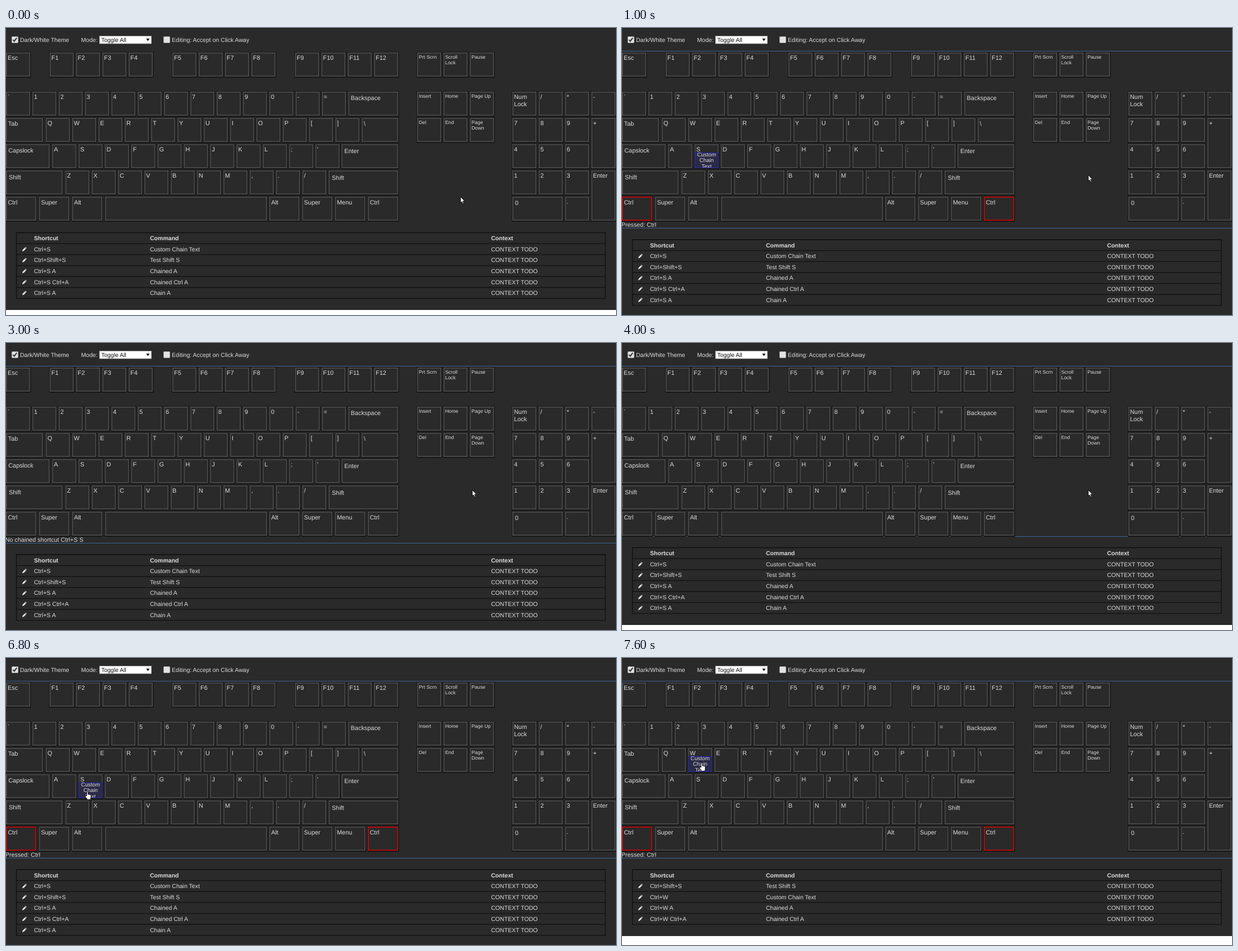
Animation of 1089 by 514 pixels, one loop 8000 ms. Source, as an HTML page:

```html
<!DOCTYPE html>
<html lang="en">
<head>
<meta charset="utf-8">
<title>Keyboard shortcuts</title>
<style>
  html, body { margin: 0; width: 100%; height: 100%; overflow: hidden; background: #fff; }
  svg { display: block; width: 1089px; height: 514px; }
  text { font-family: "Liberation Sans", Arial, sans-serif; fill: #dcdcdc; white-space: pre; text-rendering: geometricPrecision; }
</style>
</head>
<body>
<svg id="stage" viewBox="0 0 1089 514"></svg>
<script>
const stage = document.getElementById("stage");
const BG = "#2a2a2a", LOOP = 8000;
const KEY = 43, PITCH = 47;
const ROW_Y = [44, 114, 161, 208, 255, 302];

const rect = (x, y, w, h, attrs) => `<rect x="${x}" y="${y}" width="${w}" height="${h}" ${attrs}/>`;
const text = (x, y, s, size = 10.56, attrs = "") => `<text x="${x}" y="${y}" font-size="${size}" ${attrs}>${s}</text>`;

// Keyboard layout
const keys = [];
const add = (row, x, label, w = KEY, h = KEY, small = false) =>
  keys.push({ x, y: ROW_Y[row], w, h, label, small });
const run = (row, x, labels, small) =>
  labels.split(" ").forEach((s, i) => add(row, x + i * PITCH, s.replace("_", "\n"), KEY, KEY, small));

add(0, 0, "Esc");
run(0, 78, "F1 F2 F3 F4");
run(0, 297, "F5 F6 F7 F8");
run(0, 516, "F9 F10 F11 F12");
add(0, 734, "Prt Scrn", KEY, KEY, true);
run(0, 781, "Scroll_Lock Pause", true);
run(1, 0, "` 1 2 3 4 5 6 7 8 9 0 - =");
add(1, 611, "Backspace", 89);
run(1, 734, "Insert Home", true);
add(1, 828, "Page Up", KEY, KEY, true);
run(1, 904, "Num_Lock / * -");
add(2, 0, "Tab", 66);
run(2, 71, "Q W E R T Y U I O P [ ]");
add(2, 635, "\\", 65);
run(2, 734, "Del End Page_Down", true);
run(2, 904, "7 8 9");
add(2, 1045, "+", KEY, 90);
add(3, 0, "Capslock", 78);
run(3, 82.5, "A S D F G H J K L ; '");
add(3, 599, "Enter", 101);
run(3, 904, "4 5 6");
add(4, 0, "Shift", 101);
run(4, 106, "Z X C V B N M , . /");
add(4, 576, "Shift", 124);
run(4, 904, "1 2 3");
add(4, 1045, "Enter", KEY, 90);
["Ctrl", "Super", "Alt"].forEach((s, i) => add(5, i * 59, s, 54));
add(5, 177, "", 289);
["Alt", "Super", "Menu", "Ctrl"].forEach((s, i) => add(5, 470 + i * 58.7, s, 54));
add(5, 904, "0", 90);
add(5, 998, ".");

// Shortcut lists
const chain = [["Ctrl+S A", "Chained A"], ["Ctrl+S Ctrl+A", "Chained Ctrl A"], ["Ctrl+S A", "Chain A"]];
const all = [["Ctrl+S", "Custom Chain Text"], ["Ctrl+Shift+S", "Test Shift S"], ...chain];
const moved = [["Ctrl+Shift+S", "Test Shift S"], ["Ctrl+W", "Custom Chain Text"],
  ["Ctrl+W A", "Chained A"], ["Ctrl+W Ctrl+A", "Chained Ctrl A"]];

const custom = ["Custom", "Chain", "Text"];
const onS = { S: custom }, onW = { W: custom };
const held = { status: "Pressed: Ctrl", solid: ["Ctrl"] };

const scenes = [
  { at: 0, lines: false, arrow: [811, 302] },
  { at: 1000, ...held, entries: onS, arrow: [832, 263] },
  { at: 2000, status: "Waiting on chain: Ctrl+S", dotted: ["Ctrl", "S"], entries: { A: ["Chain A"] }, rows: chain, arrow: [832, 263] },
  { at: 3000, status: "No chained shortcut Ctrl+S S", arrow: [832, 263] },
  { at: 4000, arrow: [832, 263] },
  { at: 5000, ...held, entries: onS, arrow: [829.5, 263.5] },
  { at: 6000, ...held, entries: onS, arrow: [828.5, 263.5] },
  { at: 6400, ...held, entries: onS, hand: [127, 236] },
  { at: 6800, ...held, entries: onS, hand: [141, 239] },
  { at: 7200, ...held, entries: onW, hand: [138, 188] },
  { at: 7600, ...held, entries: onW, hand: [138, 188], rows: moved }
];

function drawKey(k, scene) {
  const { x, y, w, h, label, small } = k;
  const solid = scene.solid?.includes(label);
  const extra = w - KEY;
  const size = small ? 8.8 : 10.9;
  const tx = x + 3 + extra * 0.035;
  const ty = y + (small ? 10.8 : 13) + Math.min(extra, 90) * 0.05;
  let out = rect(x - 1, y - 1, w + 2.5, h + 3, 'fill="#171717"') +
    rect(x + 0.75, y + 0.75, w - 1.5, h - 1.5,
      `fill="${BG}" stroke="${solid ? "#e60000" : "#505050"}" stroke-width="1.5"`);
  if (scene.dotted?.includes(label))
    out += rect(x - 0.5, y - 0.5, w + 1, h + 1, 'fill="none" stroke="#cc1111" stroke-dasharray="1.6 1.6"');
  label.split("\n").forEach((s, i) => out += text(tx, ty + i * (small ? 9.8 : 12.5), s, size));

  const entry = scene.entries?.[label];
  if (entry) {
    const mid = y + 28.5;
    out += rect(x + 1, y + 15.5, w - 1.5, h - 16.5, 'fill="#2b2b45" stroke="#25259a" stroke-width="1.5"');
    const lines = entry.map((s, i) =>
      text(x + w / 2, mid + 3.5 + (i - (entry.length - 1) / 2) * 10.5, s, 9.85, 'text-anchor="middle"')).join("");
    out += `<svg x="${x}" y="${y}" width="${w}" height="${h - 1}" viewBox="${x} ${y} ${w} ${h - 1}">${lines}</svg>`;
  }
  return out;
}

function drawControls() {
  const box = x => rect(x + 0.5, 15.5, 11, 11, 'rx="1" fill="#e2e2e2" stroke="#aaa"');
  return box(10) + '<path d="M12.5 21l2.3 2.6 4.4-6" fill="none" stroke="#333" stroke-width="2"/>' +
    text(25, 25, "Dark/White Theme") + text(134, 25, "Mode:") +
    rect(167, 14.5, 92.5, 13.5, 'fill="#fff" stroke="#a9a9a9" stroke-width=".8"') +
    text(170, 25, "Toggle All", 10.45, 'style="fill:#111"') +
    '<path d="M250.3 19h6l-3 4.6z" fill="#111"/>' +
    box(281) + text(296, 25, "Editing: Accept on Click Away");
}

function drawTable(top, rows) {
  const step = 19.65, height = step * (rows.length + 1);
  let out = "";
  [["Shortcut", "Command", "Context"], ...rows].forEach(([a, b, c = "CONTEXT TODO"], i) => {
    const y = top + i * step, base = y + 13.6;
    const bold = i ? "" : 'font-weight="bold"';
    out += rect(18, y - 0.6, 1052.5, 1.3, 'fill="#111"') +
      text(50, base, a, 10.56, bold) + text(257, base, b, 10.56, bold) + text(866, base, c, 10.56, bold);
    if (i) out += `<path transform="translate(29 ${y + 5.8})" d="M0 8l.7-2.7L4.7 1.3 6.7 3.3 2.7 7.3zM5.2.8l.8-.8 2 2-.8.8z" fill="#e4e4e4"/>`;
  });
  return out + rect(18.6, top, 1051.3, height, 'fill="none" stroke="#111" stroke-width="1.3"');
}

function drawCursor({ arrow, hand }) {
  const [x, y] = arrow || hand;
  const d = arrow
    ? "M.5 .5V11L2.8 8.8 4.5 12.6 6.2 11.9 4.6 8.1H7.8Z"
    : "M3.2 8V1.6a1.1 1.1 0 0 1 2.2 0V5l3.8.7q1.4.4 1.4 2V11l-1.1 3.6H4.6L.9 9.6Q.1 8 1.5 7.4Z";
  return `<path transform="translate(${x} ${y})" d="${d}" fill="#fff" stroke="#000" stroke-width=".8"/>`;
}

function draw(scene) {
  const { status, lines = true, rows = all } = scene;
  const top = status ? 378.9 : 366.5;
  const end = Math.round(top + 19.65 * (rows.length + 1) + 20.4);
  const line = y => rect(0, y, 1089, 1, 'fill="#3d6299"');
  stage.innerHTML =
    rect(0, 0, 1089, end, `fill="${BG}"`) + rect(0, 0, 1089, 1, 'fill="#1f1f1f"') +
    drawControls() +
    (lines ? line(41) + line(status ? 358 : 346) : "") +
    keys.map(k => drawKey(k, scene)).join("") +
    (status ? text(-1.3, 356.2, status, 10.8) : "") +
    drawTable(top, rows) + drawCursor(scene);
}

let shown;
const start = performance.now();
function tick() {
  const t = (performance.now() - start) % LOOP;
  const scene = scenes.findLast(s => s.at <= t);
  if (scene !== shown) draw(shown = scene);
  requestAnimationFrame(tick);
}
tick();
</script>
</body>
</html>
```
